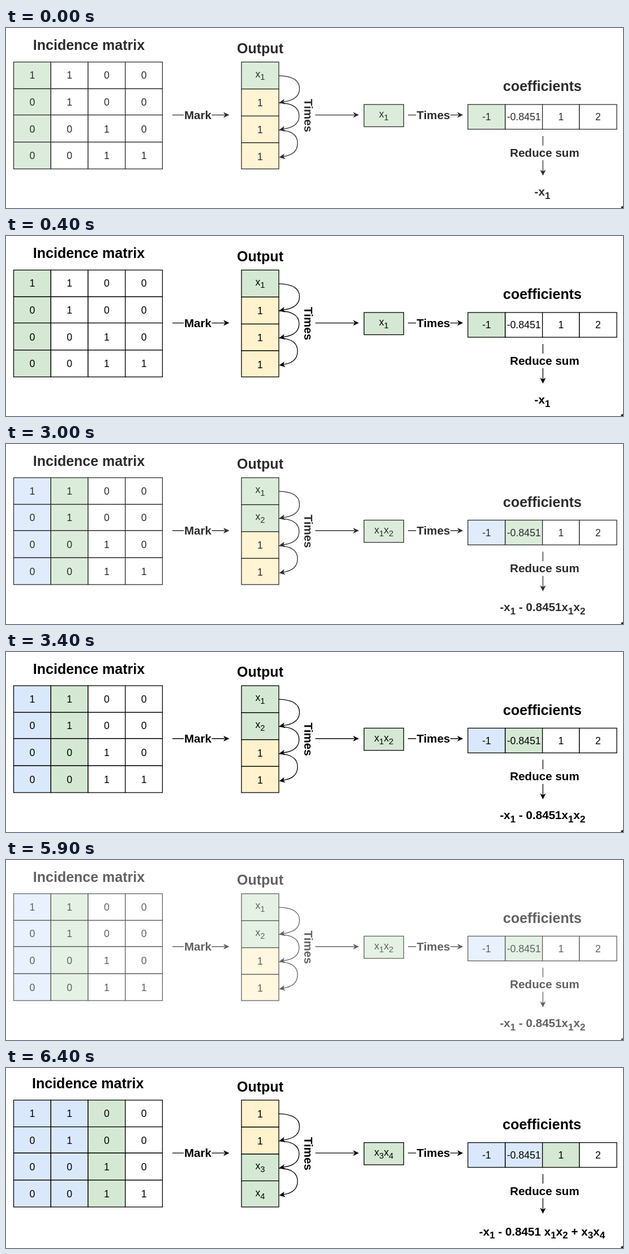
Animation, 1090 px wide and 320 px high, one loop 8000 ms. Source, as an HTML page:

```html
<!DOCTYPE html>
<html lang="en">
<head>
<meta charset="utf-8">
<title>Incidence matrix</title>
<style>
html, body { margin: 0; width: 100%; height: 100%; overflow: hidden; background: #fff; }
svg { display: block; width: 1090px; height: 320px; }
text { font-family: "Liberation Sans", Arial, sans-serif; text-anchor: middle; white-space: pre; }
</style>
</head>
<body>
<svg id="stage" viewBox="0 0 1090 320"></svg>
<script>
const GREEN = '#d5e8d4', YELLOW = '#fff2cc', BLUE = '#dae8fc', WHITE = '#fff';
const TITLE = 25, LABEL = 20.6, CELL = 17.66;
const LOOP = 8000, SCENE = 3000, STEP = 100, FADE = 400;

const columns = [13.5, 79.3, 145, 210.7, 276.4];
const matrixRows = [60.5, 108, 154.6, 202.8, 250.5];
const outputRows = [60.5, 108.5, 156.5, 204, 250.5];
const coefColumns = [816, 882, 947.7, 1013, 1079];
const matrix = ['1100', '0100', '0010', '0011'];
const coefs = ['-1', '-0.8451', '1', '2'];

const scenes = [
  { dy: 0, column: 0, output: ['x_1', '1', '1', '1'], product: 'x_1',
    sum: '-x_1', sumX: 947.5, sumY: 298, titleX: 146.5, coefX: 947.5 },
  { dy: -0.6, column: 1, output: ['x_1', 'x_2', '1', '1'], product: 'x_1x_2',
    sum: '-x_1 - 0.8451x_1x_2', sumX: 948, sumY: 297.3, titleX: 146.5, coefX: 947.5 },
  { dy: -3.4, column: 2, output: ['1', '1', 'x_3', 'x_4'], product: 'x_3x_4',
    sum: '-x_1 - 0.8451 x_1x_2 + x_3x_4', sumX: 947, sumY: 297.5, titleX: 144.7, coefX: 946.7 }
];

// "_n" sets the digit n as a subscript.
function label(x, y, str, size, bold, turn = 0) {
  const drop = size * 0.28;
  let lowered = false;
  const spans = str.split(/(_\d)/).filter(Boolean).map(part => {
    const sub = part[0] === '_';
    const dy = sub === lowered ? 0 : sub ? drop : -drop;
    lowered = sub;
    return `<tspan dy="${dy}" font-size="${sub ? size * 0.833 : size}">${sub ? part[1] : part}</tspan>`;
  }).join('');
  return `<text transform="translate(${x} ${y}) rotate(${turn})" font-size="${size}"` +
    ` font-weight="${bold ? 700 : 400}">${spans}</text>`;
}

const box = (x1, y1, x2, y2, fill) =>
  `<rect x="${x1}" y="${y1}" width="${x2 - x1}" height="${y2 - y1}" fill="${fill}" stroke="#000"/>`;

const line = d => `<path d="${d}" fill="none" stroke="#000"/>`;

const head = (x, y, angle) =>
  `<path transform="translate(${x} ${y}) rotate(${angle})" d="M0 0L-10.3 5L-7.7 0L-10.3 -5Z"/>`;

function loopArrow(y1, y2, right) {
  const mid = (y1 + y2) / 2;
  return line(`M482 ${y1}Q${right} ${y1 + 1} ${right} ${mid - 1}` +
    `Q${right} ${y2 - 5} 490 ${y2 - 1.6}`) + head(482.5, y2, 169);
}

const middle = (list, i) => (list[i] + list[i + 1]) / 2;
const shade = (i, active) => i < active ? BLUE : i === active ? GREEN : WHITE;

function diagram(s) {
  let out = '';

  matrix.forEach((row, r) => [...row].forEach((digit, c) => {
    out += box(columns[c], matrixRows[r], columns[c + 1], matrixRows[r + 1], shade(c, s.column));
    out += label(middle(columns, c), 90.3 + 47.6 * r, digit, CELL);
  }));

  s.output.forEach((value, r) => {
    const variable = value[0] === 'x';
    out += box(416, outputRows[r], 482, outputRows[r + 1], variable ? GREEN : YELLOW);
    out += label(449, 91 + 48 * r - (variable ? 3.5 : 0), value, CELL);
  });

  coefs.forEach((value, i) => {
    out += box(coefColumns[i], 136, coefColumns[i + 1], 180, shade(i, s.column));
    out += label(middle(coefColumns, i), 164.2, value, CELL);
  });

  out += box(632.5, 136, 702.5, 175.5, GREEN) + label(667.5, 159.4, s.product, CELL);

  out += loopArrow(84.8, 132.8, 518.5) + loopArrow(133, 181.2, 517.8) + loopArrow(181.4, 230, 515);
  out += line('M294 154.6H314M363.5 154.6H386') + head(394.5, 154.6, 0);
  out += line('M546.5 154.6H615') + head(623.5, 154.6, 0);
  out += line('M710 154.6H724.5M785 154.6H799') + head(807.5, 154.6, 0);
  out += line('M948.5 192V209M948.5 235V255') + head(948.5, 262.5, 90);

  out += label(339, 161.5, 'Mark', LABEL, true);
  out += label(527, 155.7, 'Times', LABEL, true, 90);
  out += label(755, 161.5, 'Times', LABEL, true);
  out += label(951.5, 229, 'Reduce sum', LABEL, true);
  out += label(s.titleX, 39.2, 'Incidence matrix', TITLE, true);
  out += label(449, 45, 'Output', TITLE, true);
  out += label(s.coefX, 112.2, 'coefficients', TITLE, true);

  return `<g stroke-width="1.3"><g transform="translate(0 ${s.dy})">${out}</g>` +
    label(s.sumX, s.sumY, s.sum, LABEL, true) +
    '<circle cx="1090" cy="320" r="3.6"/></g>';
}

const stage = document.getElementById('stage');
stage.innerHTML = scenes.map(diagram).join('');
const groups = [...stage.children];

// Both ends of a scene pale in four steps; the last scene holds to the end.
function opacityAt(index, t) {
  const last = index === scenes.length - 1;
  const fromOut = t - (SCENE - FADE);
  const fade = t < FADE ? t : !last && fromOut >= 0 ? fromOut : -1;
  return fade < 0 ? 1 : 0.83 - 0.07 * Math.floor(fade / STEP);
}

function draw(time) {
  const t = time % LOOP;
  const index = Math.floor(t / SCENE);
  groups.forEach((g, i) => {
    g.style.display = i === index ? '' : 'none';
  });
  groups[index].setAttribute('opacity', opacityAt(index, t - index * SCENE));
}

const start = performance.now();
function tick() {
  draw(performance.now() - start);
  requestAnimationFrame(tick);
}
tick();
</script>
</body>
</html>
```
